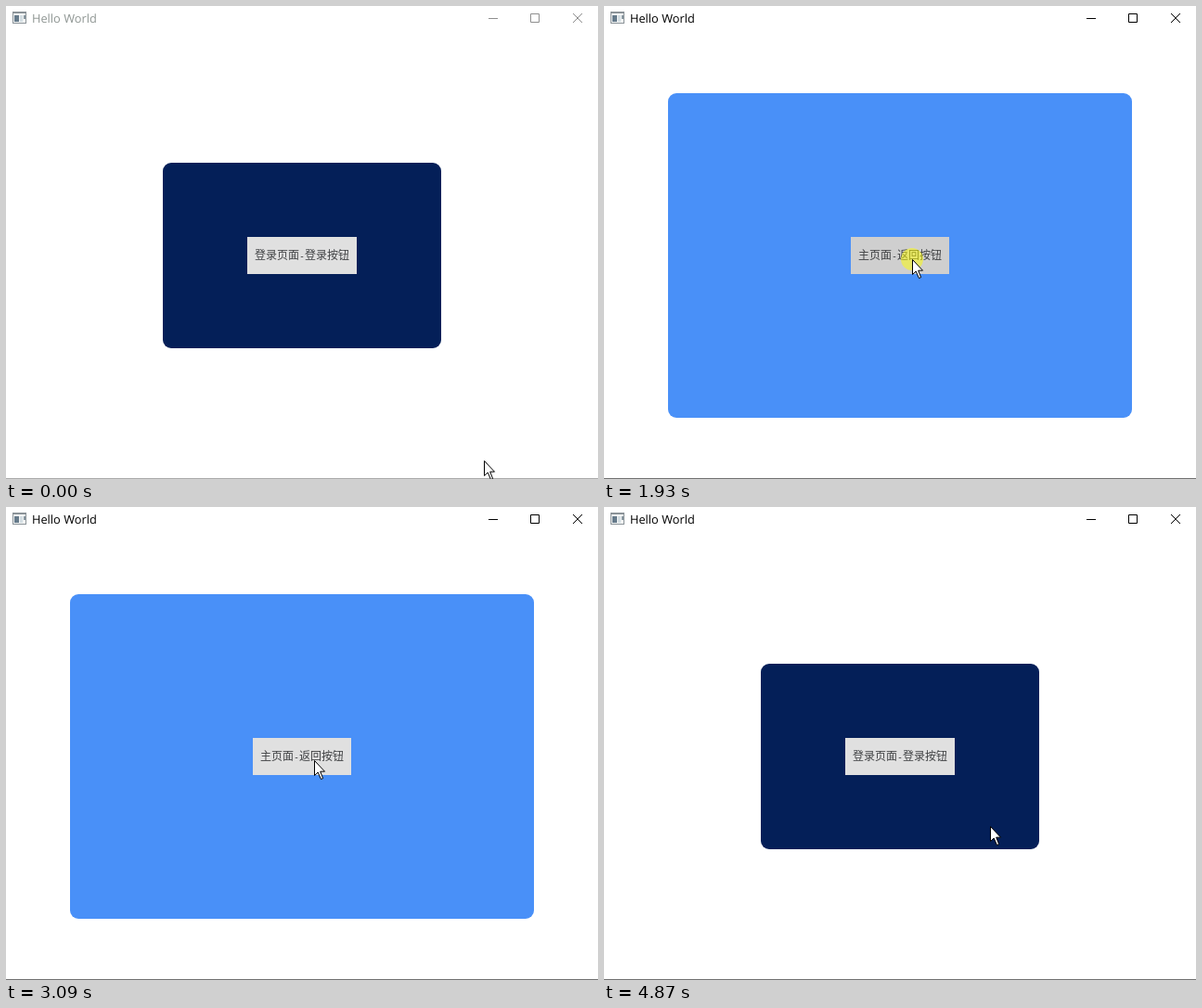
An HTML page for the animation above (4.94 s loop, 638 by 510 pixels).

```html
<!DOCTYPE html>
<html lang="zh">
<head>
<meta charset="utf-8">
<style>
  html, body { margin: 0; width: 100%; height: 100%; overflow: hidden; background: #fff; }
  svg { display: block; width: 638px; height: 510px; }
  .title { font: 12.8px "Open Sans", "Noto Sans", sans-serif; text-rendering: geometricPrecision; }
  .label { font: 12px "Noto Sans CJK SC", "Noto Sans CJK", sans-serif; fill: #404244; }
  .dash { font: 10px "DejaVu Sans Mono", monospace; }
</style>
</head>
<body>
<svg viewBox="0 0 638 510">
  <rect width="638" height="510" fill="#fff"/>

  <g shape-rendering="crispEdges">
    <rect x="7" y="6" width="15" height="13" fill="#8b9398"/>
    <rect x="8" y="8" width="13" height="10" fill="#f2f4f4"/>
    <rect x="9" y="10" width="5" height="7" fill="#667b8b"/>
    <rect x="15" y="10" width="3" height="7" fill="#d3dde2"/>
    <rect x="19" y="10" width="2" height="4" fill="#8796a0"/>
  </g>
  <text id="title" class="title" x="28" y="18">Hello World</text>
  <g id="controls" fill="none">
    <path d="M520 13.5h10M565.5 8.5h9v9h-9z"/>
    <path d="M611 8l10 10M621 8l-10 10"/>
  </g>

  <g id="login">
    <rect x="169" y="169" width="300" height="200" rx="9" fill="#041f58"/>
    <rect class="button" x="260" y="249" width="118" height="40"/>
    <text class="label" y="273"><tspan x="268">登录页面</tspan><tspan class="dash" x="316">-</tspan><tspan x="322">登录按钮</tspan></text>
  </g>
  <g id="main">
    <rect x="69" y="94" width="500" height="350" rx="9" fill="#4990f8"/>
    <rect class="button" x="266" y="249" width="106" height="40"/>
    <text class="label" y="273"><tspan x="274">主页面</tspan><tspan class="dash" x="310">-</tspan><tspan x="316">返回按钮</tspan></text>
  </g>

  <rect id="edge" y="509" width="638" height="1"/>
  <circle id="halo" cx="332" cy="273" r="12" fill="#ff0" fill-opacity=".5"/>
  <path id="cursor" d="M.5 .5V16.5L4.2 13L7.5 20.5L9.6 19.6L6.7 12.2H11.5Z" fill="#fff" stroke="#000"/>
</svg>
<script>
const LOOP = 4940;
const ACTIVATE = 840;
const $ = id => document.getElementById(id);
const buttons = document.querySelectorAll('.button');

// Each press lasts until its release, which switches the page.
const presses = [[840, 1070], [1930, 2160], [2860, 3090], [3940, 4410]];

const moves = [
  { start: 70, end: 530, steps: 7, from: [515, 490], to: [337, 283], ease: p => Math.sin(p * Math.PI / 2) },
  { start: 610, end: 690, steps: 2, from: [337, 283], to: [332, 273], ease: p => p },
  { start: 4640, end: 4870, steps: 4, from: [332, 273], to: [416, 344], ease: p => p }
];

function cursorAt(t) {
  const move = moves.filter(m => t >= m.start).pop();
  if (!move) return moves[0].from;
  const { start, end, steps, from, to, ease } = move;
  const interval = (end - start) / (steps - 1);
  const step = Math.min(steps, Math.floor((t - start) / interval + 1.02));
  const p = ease(step / steps);
  return from.map((v, i) => Math.round(v + (to[i] - v) * p));
}

const show = (id, on) => $(id).setAttribute('visibility', on ? 'visible' : 'hidden');

function render(t) {
  const active = t >= ACTIVATE;
  const pressed = presses.some(([down, up]) => t >= down && t < up);
  const onMain = presses.filter(([, up]) => t >= up).length % 2 === 1;

  $('title').setAttribute('fill', active ? '#000' : '#8f9693');
  $('controls').setAttribute('stroke', active ? '#000' : '#8f8f8f');
  $('edge').setAttribute('fill', active ? '#707070' : '#aaa');
  show('login', !onMain);
  show('main', onMain);
  show('halo', pressed);
  buttons.forEach(b => b.setAttribute('fill', pressed ? '#cfcfcf' : '#e0e0e0'));
  $('cursor').setAttribute('transform', `translate(${cursorAt(t)})`);
}

const origin = performance.now();
function tick() {
  render((performance.now() - origin) % LOOP);
  requestAnimationFrame(tick);
}
render(0);
requestAnimationFrame(tick);
</script>
</body>
</html>
```
